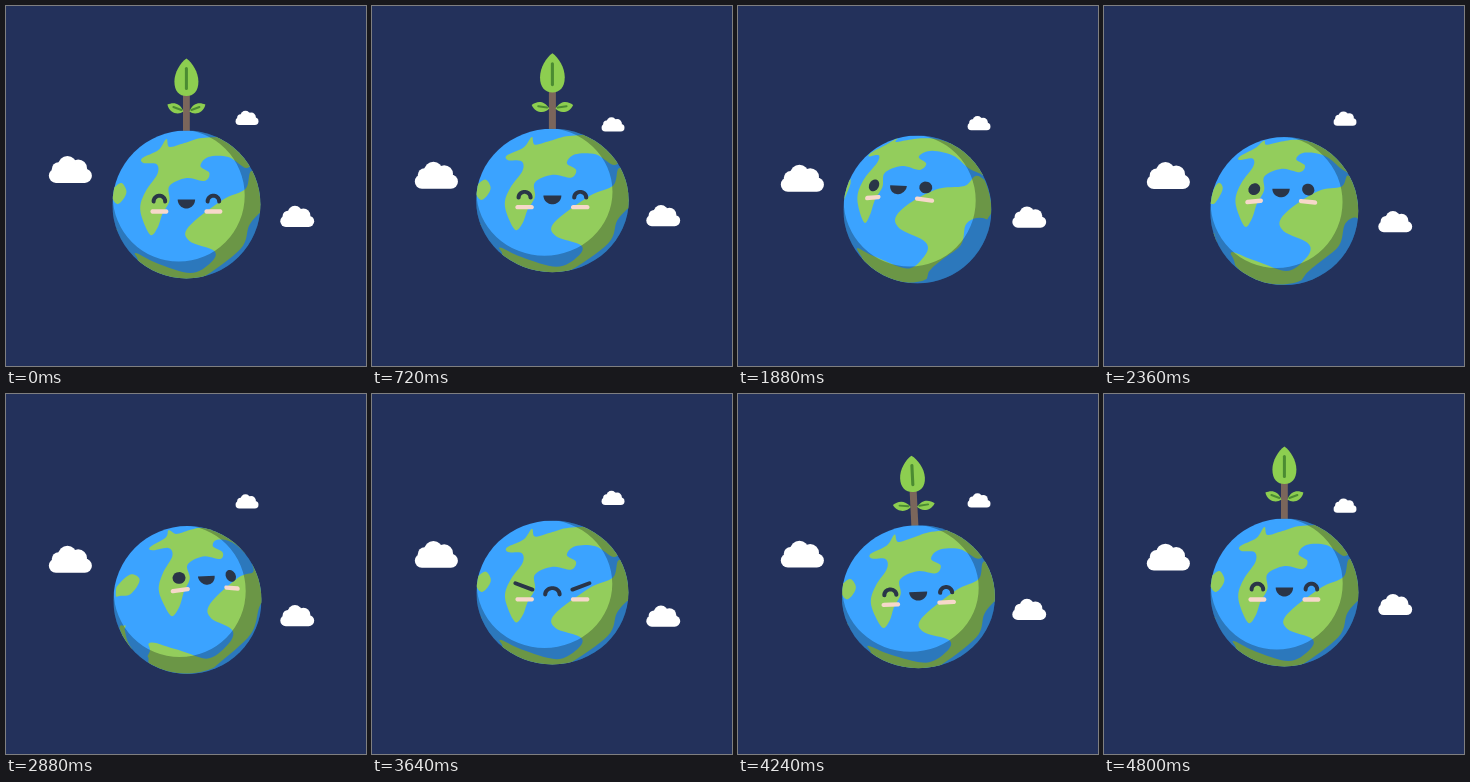
An HTML page with a canvas that plays this animation: 360x360 px, repeating every 4840 ms.

```html
<!DOCTYPE html>
<html lang="en">
<head>
<meta charset="utf-8">
<title>Happy planet</title>
<style>
  html, body { margin: 0; width: 100%; height: 100%; overflow: hidden; background: #23315b; }
  canvas { display: block; width: 360px; height: 360px; }
</style>
</head>
<body>
<canvas id="stage" width="360" height="360"></canvas>
<script>
const ctx = document.getElementById('stage').getContext('2d');
const LOOP = 4840, STEP = 40, R = 74, TAU = Math.PI * 2, DEG = Math.PI / 180;
const BLUE = '#3ba3ff', GREEN = '#93cd5c', INK = '#2a3548', BLUSH = '#f7d8ca';

// Key points of each coast in the front view, joined by a spline.
const AMERICAS = coast([
  [160, 133], [152, 144], [136, 152], [137, 157], [150, 158], [151, 168], [140, 184],
  [134, 199], [136, 213], [144, 229], [151, 222], [156, 208], [163, 195], [163, 180],
  [180, 172], [198, 175], [203, 167], [194, 160], [202, 151], [222, 151], [240, 162],
  [247, 150], [222, 133], [196, 132], [178, 137], [163, 141]
]);
const AFRICA_AND_ICE = coast([
  [246, 165], [239, 183], [216, 194], [182, 221], [183, 235], [208, 245], [204, 257],
  [184, 267], [150, 257], [129, 247], [132, 257], [126, 282], [165, 285], [194, 273],
  [234, 243], [243, 219], [256, 204], [270, 190]
]);
const WEST_ISLE = coast([[115, 177], [120, 185], [117, 193], [111, 198], [106, 192], [107, 183]]);
const FAR_ISLE = coast([[106, 222], [111, 226], [104, 243], [101, 259], [85, 250], [92, 228]]);
const LANDS = [AMERICAS, AFRICA_AND_ICE, WEST_ISLE, FAR_ISLE];

function coast(points) {
  const n = points.length, out = [];
  for (let i = 0; i < n; i++) {
    const quad = [-1, 0, 1, 2].map(k => points[(i + k + n) % n]);
    for (let u = 0; u < 1; u += 0.125) {
      out.push([spline(quad.map(p => p[0]), u) - 180, spline(quad.map(p => p[1]), u) - 198.5]);
    }
  }
  return out;
}

function spline([a, b, c, d], u) {
  return b + u / 2 * (c - a + u * (2 * a - 5 * b + 4 * c - d + u * (3 * (b - c) + d - a)));
}

const ramp = (t, from, to) => Math.min(1, Math.max(0, (t - from) / (to - from)));
const ease = (t, from, to) => { const u = ramp(t, from, to); return u * u * (3 - 2 * u); };
const backIn = u => u * u * (2.7 * u - 1.7);

// A swing that builds up to its lowest point and then dies away.
function bounce(t, peak, rise, lag) {
  const s = t - peak;
  const strength = s < 0 ? Math.sin(ramp(s, -rise, 0) * Math.PI / 2) : Math.exp(-s / 500) * (1 - ease(s, 500, 800));
  return strength * Math.cos(TAU * (s - lag) / 300);
}

function poseAt(t) {
  const swing = lag => bounce(t, 930, 330, lag) + bounce(t, 3880, 100, lag);
  const strain = 0.027 * (ease(t, 3280, 3640) - ease(t, 3880, 4000));
  const wobble = 0.07 * swing(60);
  const rest = 198.5 + 5 * ease(t, 600, 1160) + 2.5 * ease(t, 1960, 2640) - 7.5 * ease(t, 3280, 3640);
  return {
    y: rest + 28 * swing(0),
    squash: strain + wobble,
    tilt: t > 3880 ? -78 * wobble : 0,
    plant: t < 2000 ? 1 - backIn(ramp(t, 640, 920)) : 1 - backIn(1 - ramp(t, 3900, 4140)),
    look: 2 * ease(t, 2200, 2560) - ease(t, 1500, 1800) - ease(t, 3040, 3300),
    lift: ease(t, 1500, 1800) - ease(t, 3040, 3300),
    mood: t < 880 || t >= 3960 ? 'happy' : t >= 3280 ? 'angry' : 'calm'
  };
}

// Turns a point of the front view on the sphere; hidden points slide to the rim.
function turn([px, py], yaw, pitch) {
  const r = Math.hypot(px, py) || 1e-6;
  const angle = r < R ? Math.asin(r / R) : Math.PI / 2 + (r - R) / R;
  const x0 = px / r * Math.sin(angle), y0 = py / r * Math.sin(angle), z0 = Math.cos(angle);
  const x = x0 * Math.cos(yaw) + z0 * Math.sin(yaw);
  const z1 = z0 * Math.cos(yaw) - x0 * Math.sin(yaw);
  const y = y0 * Math.cos(pitch) - z1 * Math.sin(pitch);
  const z = z1 * Math.cos(pitch) + y0 * Math.sin(pitch);
  const k = z < 0 ? R * 1.03 / Math.hypot(x, y) : R;
  return [x * k, y * k];
}

function arc(cx, cy, rx, ry, from, to) {
  return Array.from({ length: 25 }, (_, i) => {
    const a = from + (to - from) * i / 24;
    return [cx + rx * Math.cos(a), cy + ry * Math.sin(a)];
  });
}

function disc(x, y, r) {
  ctx.beginPath();
  ctx.arc(x, y, r, 0, TAU);
  ctx.fill();
}

function drawCloud(x, y, size) {
  ctx.save();
  ctx.translate(x, y);
  ctx.scale(size, size);
  ctx.fillStyle = '#fff';
  ctx.beginPath();
  ctx.roundRect(0, 13, 44, 14.5, 7.2);
  ctx.fill();
  disc(19, 9.5, 9.5);
  disc(30, 12.5, 9);
  disc(10, 13.5, 7);
  ctx.restore();
}

function drawClouds(t) {
  const phase = shift => TAU * (t - shift) / LOOP;
  drawCloud(42.8, 152.8 + 6.5 * Math.sin(phase(350)), 0.98);
  drawCloud(229.6, 104.8 + 8 * Math.sin(phase(0)), 0.52);
  drawCloud(274.3, 204 + 7 * Math.sin(phase(2080)) - 2 * Math.cos(2 * phase(2080)), 0.77);
}

function drawPlant(size, droop) {
  if (size < 0.02) return;
  ctx.save();
  ctx.translate(0, -70);
  ctx.scale(Math.min(1, size), size);
  ctx.lineCap = 'round';
  ctx.strokeStyle = '#4b8b32';
  ctx.fillStyle = '#7b665b';
  ctx.fillRect(-3.4, -46, 6.8, 52);
  ctx.fillStyle = '#8dce50';
  for (const side of [-1, 1]) {
    ctx.save();
    ctx.scale(side, 1);
    ctx.translate(3, -23);
    ctx.rotate(droop);
    ctx.fill(new Path2D('M0 0C4-10 11-9 16-7C14 2 5 4 0 0Z'));
    ctx.lineWidth = 2;
    ctx.stroke(new Path2D('M2-1.5L10-4.5'));
    ctx.restore();
  }
  ctx.fill(new Path2D('M0-76C6-72 12-62 12-53C12-43 7-38.5 0-38.5C-7-38.5-12-43-12-53C-12-62-6-72 0-76Z'));
  ctx.lineWidth = 3;
  ctx.stroke(new Path2D('M0-66L0-46'));
  ctx.restore();
}

function drawFace(mood, trace) {
  const fill = (pts, color) => { trace(pts); ctx.fillStyle = color; ctx.fill(); };
  const line = pts => { trace(pts, true); ctx.stroke(); };
  ctx.strokeStyle = INK;
  ctx.lineWidth = 4;
  ctx.lineCap = ctx.lineJoin = 'round';
  for (const side of [-1, 1]) {
    const x = side * 27, quarter = Math.PI / 2;
    const cheek = [...arc(x + 6.8, 7, 2.2, 2.2, -quarter, quarter),
                   ...arc(x - 6.8, 7, 2.2, 2.2, quarter, 3 * quarter)];
    fill(cheek, BLUSH);
    if (mood === 'happy') line(arc(x, -3, 5.8, 5.8, Math.PI, TAU));
    else if (mood === 'angry') line([[side * 36, -9.5], [side * 19.5, -3]]);
    else fill(arc(x, -5.5, 6, 6.2, 0, TAU), INK);
  }
  if (mood === 'angry') line(arc(0, 2, 7, 6.5, Math.PI, TAU));
  else fill(arc(0, -5, 8.7, 9, 0, Math.PI), INK);
}

function drawPlanet(t) {
  const { y, squash, tilt, plant, look, lift, mood } = poseAt(t);
  const trace = (pts, open) => {
    ctx.beginPath();
    pts.forEach(p => ctx.lineTo(...turn(p, look * 17 * DEG, lift * 13.8 * DEG)));
    if (!open) ctx.closePath();
  };

  ctx.save();
  ctx.translate(180.4 + look, y);
  ctx.scale(1 + squash, 1 - squash);
  ctx.save();
  ctx.rotate(tilt * DEG);
  drawPlant(plant, squash * 7);
  ctx.restore();

  ctx.beginPath();
  ctx.arc(0, 0, R, 0, TAU);
  ctx.clip();
  ctx.fillStyle = BLUE;
  ctx.fillRect(-R, -R, 2 * R, 2 * R);

  const roll = (tilt - look * 6.5) * DEG;
  ctx.save();
  ctx.rotate(roll);
  ctx.fillStyle = GREEN;
  for (const land of LANDS) {
    trace(land);
    ctx.fill();
  }
  ctx.restore();

  ctx.fillStyle = 'rgba(5, 10, 15, 0.28)';
  ctx.beginPath();
  ctx.rect(-R, -R, 2 * R, 2 * R);
  ctx.arc(-7.7, -9, 66, 0, TAU);
  ctx.fill('evenodd');

  ctx.rotate(roll);
  drawFace(mood, trace);
  ctx.restore();
}

const start = performance.now();
function frame(now) {
  const elapsed = Math.max(0, now - start) % LOOP;
  const t = Math.floor(elapsed / STEP) * STEP;
  ctx.fillStyle = '#23315b';
  ctx.fillRect(0, 0, 360, 360);
  drawClouds(t);
  drawPlanet(t);
  requestAnimationFrame(frame);
}
frame(start);
</script>
</body>
</html>
```
